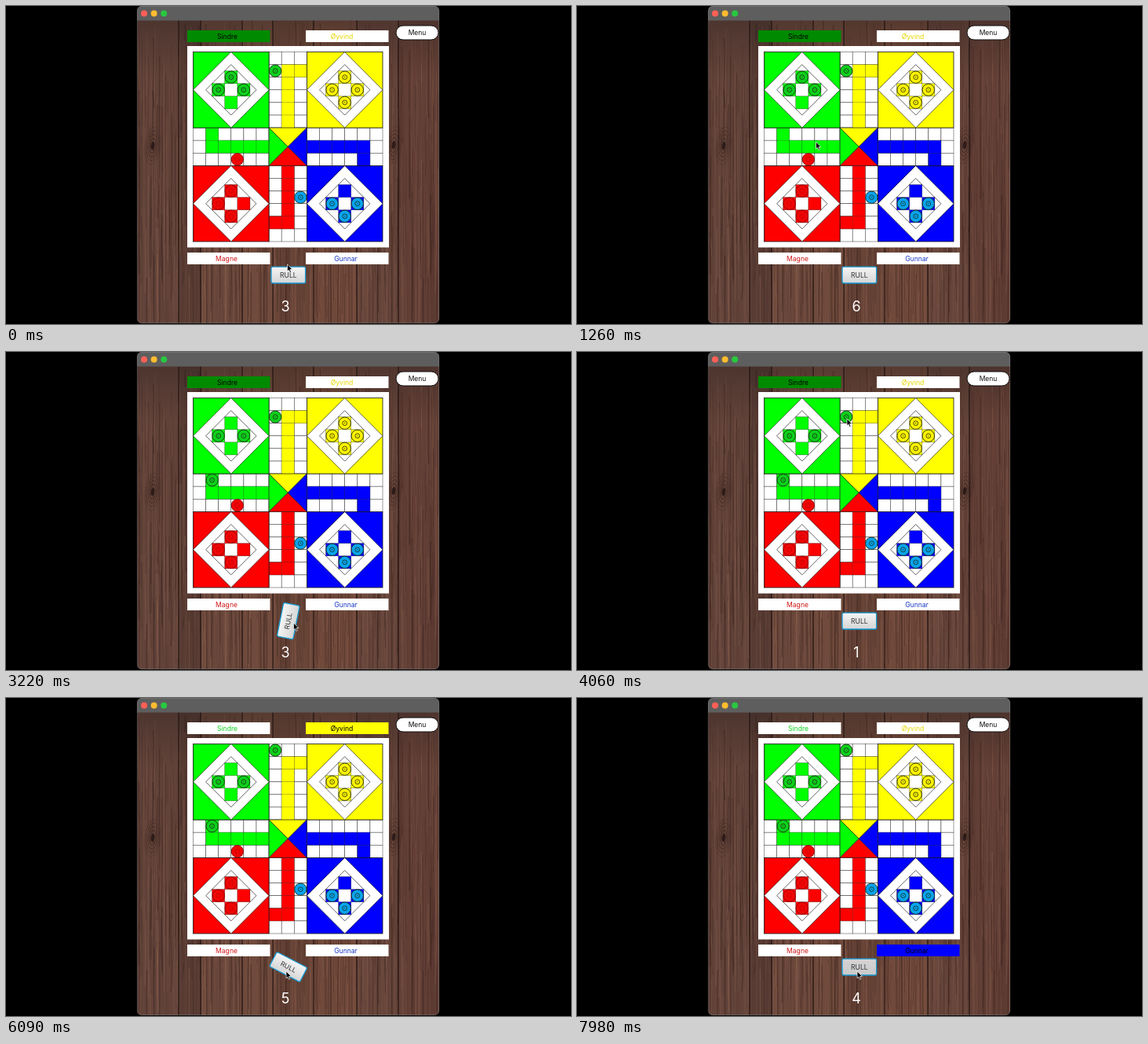
Write an HTML page with a canvas that moves like this. It is 720 px wide and 405 px high and loops after 8000 ms.

```html
<!DOCTYPE html>
<html lang="no">
<head>
<meta charset="utf-8">
<title>Ludo</title>
<style>
  html, body { margin: 0; width: 100%; height: 100%; overflow: hidden; background: #000; }
  canvas { display: block; width: 720px; height: 405px; }
</style>
</head>
<body>
<canvas id="stage"></canvas>
<script>
const W = 720, H = 405, LOOP = 8000, STEP = 70;
const FONT = 'Inter, "Open Sans", sans-serif';
const CELL = 16.1, LEFT = 238.5, TOP = 58.5;
const scale = Math.max(1, window.devicePixelRatio || 1);

const COLORS = { green: '#00ff00', yellow: '#ffff00', red: '#ff0000', blue: '#0000ff' };
const PIECES = { green: '#0ed01c', yellow: '#fff200', red: '#f00505', blue: '#08a4ee' };
const HOUSES = { green: [0, 0], yellow: [9, 0], red: [0, 9], blue: [9, 9] };
const SPOTS = { top: [0, -1], left: [-1, 0], right: [1, 0], bottom: [0, 1] };

const LABELS = [
  { id: 'green', name: 'Sindre', x: 231, y: 31, tx: 282, ink: '#12d222', active: '#008a00' },
  { id: 'yellow', name: 'Øyvind', x: 382, y: 31, tx: 428, ink: '#e5d800', active: '#ffff00' },
  { id: 'red', name: 'Magne', x: 231, y: 314, tx: 281, ink: '#d01818', active: '#ff0000' },
  { id: 'blue', name: 'Gunnar', x: 382, y: 314, tx: 433, ink: '#1836c4', active: '#0000ff' }
];

// Each entry holds from its time on.
const TURNS = [[0, 'green'], [4130, 'yellow'], [7700, 'blue']];
const ROLLS = [[0, 3], [320, 6], [2875, 3], [3500, 1], [4867, 4], [6036, 5], [7060, 4]];
// Press time and start of the spin.
const SPINS = [[280, 320], [2800, 2875], [4830, 4867], [5950, 6036], [7000, 7060], [7980, 8040]];
const SPIN_MS = 600, SPIN_DEG = 1080;
const OUT_AT = 1400, MOVE_AT = 4130;

const POINTER = [
  [0, 358.5, 329], [1190, 358.5, 329], [1260, 304.5, 173], [1330, 287, 95],
  [2310, 287, 95], [2660, 366.5, 345], [3850, 366.5, 345], [3990, 344, 85],
  [4340, 344, 85], [4620, 357, 348], [LOOP, 357, 348]
];

function makeLayer(el) {
  el.width = W * scale;
  el.height = H * scale;
  const c = el.getContext('2d');
  c.scale(scale, scale);
  return c;
}

const ctx = makeLayer(document.getElementById('stage'));
const backdrop = document.createElement('canvas');
const board = document.createElement('canvas');

function random(seed) {
  return () => {
    seed = (seed * 1664525 + 1013904223) >>> 0;
    return seed / 4294967296;
  };
}

function circle(c, x, y, r, fill, stroke, width = 0.8) {
  c.beginPath();
  c.arc(x, y, r, 0, Math.PI * 2);
  if (fill) { c.fillStyle = fill; c.fill(); }
  if (stroke) { c.strokeStyle = stroke; c.lineWidth = width; c.stroke(); }
}

function polygon(c, points, fill, stroke) {
  c.beginPath();
  points.forEach(([x, y]) => c.lineTo(x, y));
  c.closePath();
  if (fill) { c.fillStyle = fill; c.fill(); }
  if (stroke) { c.strokeStyle = stroke; c.lineWidth = 0.7; c.stroke(); }
}

function box(c, x, y, w, h, r, fill, stroke, width = 1) {
  c.beginPath();
  c.roundRect(x, y, w, h, r);
  if (fill) { c.fillStyle = fill; c.fill(); }
  if (stroke) { c.strokeStyle = stroke; c.lineWidth = width; c.stroke(); }
}

function text(c, str, x, y, size, fill) {
  c.font = `${size}px ${FONT}`;
  c.textAlign = 'center';
  c.textBaseline = 'middle';
  c.fillStyle = fill;
  c.fillText(str, x, y);
}

function paintWood(c) {
  const rnd = random(41);
  const seams = [167, 220, 248, 301, 340, 392, 447, 500, 553];
  const tones = ['#62433a', '#583c34', '#6a473b', '#704b3d', '#694538', '#70493b', '#65443a', '#623f36'];
  tones.forEach((tone, i) => {
    const x = seams[i], w = seams[i + 1] - x;
    c.save();
    c.beginPath();
    c.rect(x, 18, w, 387);
    c.clip();
    c.fillStyle = tone;
    c.fillRect(x, 18, w, 387);
    for (let n = 0; n < w * 2.2; n++) {
      const gx = x + rnd() * w, y0 = 18 + rnd() * 330, len = 50 + rnd() * 190;
      const sway = (rnd() - 0.5) * 7;
      c.strokeStyle = rnd() < 0.56
        ? `rgba(38,20,17,${0.08 + rnd() * 0.24})`
        : `rgba(164,116,94,${0.06 + rnd() * 0.18})`;
      c.lineWidth = 0.4 + rnd() * 1.3;
      c.beginPath();
      c.moveTo(gx, y0);
      c.bezierCurveTo(gx + sway, y0 + len / 3, gx - sway, y0 + len * 2 / 3, gx + sway / 3, y0 + len);
      c.stroke();
    }
    c.restore();
    c.fillStyle = 'rgba(24,13,12,.72)';
    c.fillRect(x - 0.6, 18, 1.4, 387);
    c.fillStyle = 'rgba(160,115,94,.15)';
    c.fillRect(x + 1, 18, 0.8, 387);
  });
  [[187, 178, 5, 12], [494, 177, 5, 12]].forEach(([x, y, rx, ry]) => {
    for (let i = 4; i >= 0; i--) {
      c.beginPath();
      c.ellipse(x, y, rx * (0.4 + i * 0.4), ry * (0.4 + i * 0.4), 0.12, 0, Math.PI * 2);
      c.strokeStyle = `rgba(32,17,15,${0.65 - i * 0.12})`;
      c.lineWidth = 1;
      c.stroke();
      if (!i) { c.fillStyle = '#2d1c19'; c.fill(); }
    }
  });
  const shade = c.createLinearGradient(0, 18, 0, 90);
  shade.addColorStop(0, 'rgba(22,18,18,.28)');
  shade.addColorStop(1, 'rgba(22,18,18,0)');
  c.fillStyle = shade;
  c.fillRect(167, 18, 386, 72);
}

function paintWindow(c) {
  c.fillStyle = '#000';
  c.fillRect(0, 0, W, H);
  c.save();
  c.beginPath();
  c.roundRect(167, 0, 385, 404, 6);
  c.clip();
  paintWood(c);
  c.fillStyle = '#5e5e5e';
  c.fillRect(167, 0, 386, 18.5);
  c.restore();
  box(c, 167.3, 0.3, 384.4, 403.4, 6, null, 'rgba(150,150,150,.55)', 0.7);
  ['#ff5f57', '#febc2e', '#28c840'].forEach((color, i) => circle(c, 176 + i * 12.6, 9.5, 4, color));
  box(c, 497, 25, 54, 18, 9, '#fff', '#111', 1);
  text(c, 'Menu', 524, 34.3, 8.5, '#111');
}

function cell(c, col, row, fill, alpha = 0.65) {
  const x = LEFT + col * CELL, y = TOP + row * CELL;
  c.fillStyle = fill;
  c.fillRect(x, y, CELL, CELL);
  c.strokeStyle = `rgba(0,0,0,${alpha})`;
  c.lineWidth = 0.6;
  c.strokeRect(x, y, CELL, CELL);
}

function diamond(c, x, y, r, fill) {
  polygon(c, [[x, y - r], [x + r, y], [x, y + r], [x - r, y]], fill, '#222');
}

function houseCenter(id) {
  const [col, row] = HOUSES[id];
  return [LEFT + (col + 3) * CELL, TOP + (row + 3) * CELL];
}

function paintBoard(c) {
  c.fillStyle = '#fff';
  c.fillRect(231, 51, 257, 256.5);
  for (let i = 0; i < 15; i++) {
    for (let j = 6; j < 9; j++) {
      cell(c, i, j, '#fff');
      cell(c, j, i, '#fff');
    }
  }
  const lane = (id, list) => list.forEach(([x, y]) => cell(c, x, y, COLORS[id], 0.25));
  const run = (from, fn) => Array.from({ length: 5 }, (_, i) => fn(from + i));
  lane('green', [[1, 6], ...run(1, i => [i, 7])]);
  lane('yellow', [[8, 1], ...run(1, i => [7, i])]);
  lane('red', [[6, 13], ...run(9, i => [7, i])]);
  lane('blue', [[13, 8], ...run(9, i => [i, 7])]);

  const a = LEFT + 6 * CELL, b = a + 3 * CELL, t = TOP + 6 * CELL, u = t + 3 * CELL;
  const mid = [(a + b) / 2, (t + u) / 2];
  polygon(c, [[a, t], [b, t], mid], COLORS.yellow, '#222');
  polygon(c, [[a, t], [a, u], mid], COLORS.green, '#222');
  polygon(c, [[a, u], [b, u], mid], COLORS.red, '#222');
  polygon(c, [[b, t], [b, u], mid], COLORS.blue, '#222');

  for (const id in HOUSES) {
    const [x, y] = houseCenter(id), half = 3 * CELL;
    c.fillStyle = COLORS[id];
    c.fillRect(x - half, y - half, half * 2, half * 2);
    c.strokeStyle = '#111';
    c.lineWidth = 0.8;
    c.strokeRect(x - half, y - half, half * 2, half * 2);
    diamond(c, x, y, half, '#fff');
    diamond(c, x, y, CELL * 2, '#fff');
    const [col, row] = HOUSES[id];
    Object.values(SPOTS).forEach(([dx, dy]) => cell(c, col + 2.5 + dx, row + 2.5 + dy, COLORS[id], 0.5));
  }
}

function piece(id, x, y) {
  const line = id === 'red' ? '#8a0000' : '#1b2a12';
  circle(ctx, x, y, 7.7, PIECES[id], line, 0.9);
  if (id === 'red') {
    circle(ctx, x, y, 2.8, null, 'rgba(130,0,0,.45)', 0.6);
    return;
  }
  circle(ctx, x, y, 2.9, null, line, 0.8);
  circle(ctx, x, y, 0.6, line);
}

function pieceAt(id, col, row) {
  piece(id, LEFT + (col + 0.5) * CELL, TOP + (row + 0.5) * CELL);
}

function paintPieces(t) {
  const out = t >= OUT_AT;
  const home = {
    green: out ? ['left', 'right'] : ['top', 'left', 'right'],
    yellow: ['top', 'left', 'right', 'bottom'],
    red: ['top', 'left', 'bottom'],
    blue: ['left', 'right', 'bottom']
  };
  for (const id in home) {
    const [x, y] = houseCenter(id);
    home[id].forEach(s => piece(id, x + SPOTS[s][0] * CELL, y + SPOTS[s][1] * CELL));
  }
  pieceAt('green', 6, t >= MOVE_AT ? 0 : 1);
  if (out) pieceAt('green', 1, 6);
  pieceAt('red', 3, 8);
  pieceAt('blue', 8, 11);
}

function latest(list, t) {
  return list.filter(([at]) => at <= t).pop()[1];
}

// Accelerates over the first fifth, slows over the last.
function easeBoth(p) {
  if (p < 0.2) return 3.125 * p * p;
  if (p > 0.8) return 1 - 3.125 * (1 - p) ** 2;
  return 1.25 * p - 0.125;
}

function paintButton(t) {
  let angle = 0, pressed = false;
  for (const [press, start] of SPINS) {
    if (t >= press && t < start) pressed = true;
    if (t >= start && t < start + SPIN_MS) angle = SPIN_DEG * easeBoth((t - start) / SPIN_MS);
  }
  const fill = ctx.createLinearGradient(0, -10, 0, 10);
  fill.addColorStop(0, pressed ? '#d4d4d4' : '#f4f4f4');
  fill.addColorStop(1, pressed ? '#cacaca' : '#d6d6d6');
  ctx.save();
  ctx.translate(359.8, 342.6);
  ctx.rotate(angle * Math.PI / 180);
  box(ctx, -21.8, -10.4, 43.6, 20.8, 2, fill, '#169bd5', 1.3);
  text(ctx, 'RULL', 0, 0.4, 8.5, '#333');
  ctx.restore();
}

function paintPointer(t) {
  const i = POINTER.findIndex(([at]) => at > t);
  const [t0, x0, y0] = POINTER[i - 1], [t1, x1, y1] = POINTER[i];
  const p = (t - t0) / (t1 - t0);
  ctx.save();
  ctx.translate(x0 + (x1 - x0) * p, y0 + (y1 - y0) * p);
  polygon(ctx, [[0, 0], [0, 9], [2, 7.2], [3.5, 10.4], [5, 9.7], [3.6, 6.6], [6.4, 6.4]], '#000', '#fff');
  ctx.restore();
}

function draw(t) {
  ctx.drawImage(backdrop, 0, 0, W, H);
  ctx.drawImage(board, 0, 0, W, H);
  const turn = latest(TURNS, t);
  for (const l of LABELS) {
    const on = l.id === turn;
    ctx.fillStyle = on ? l.active : '#fff';
    ctx.fillRect(l.x, l.y, 105.5, 15);
    text(ctx, l.name, l.tx, l.y + 8, 8.6, on ? '#000' : l.ink);
  }
  paintPieces(t);
  text(ctx, String(latest(ROLLS, t)), 356, 384, 18, '#fff');
  paintButton(t);
  paintPointer(t);
}

paintWindow(makeLayer(backdrop));
paintBoard(makeLayer(board));

const began = performance.now();
function tick() {
  const t = (performance.now() - began) % LOOP;
  draw(Math.floor(t / STEP) * STEP);
  requestAnimationFrame(tick);
}
tick();
</script>
</body>
</html>
```
